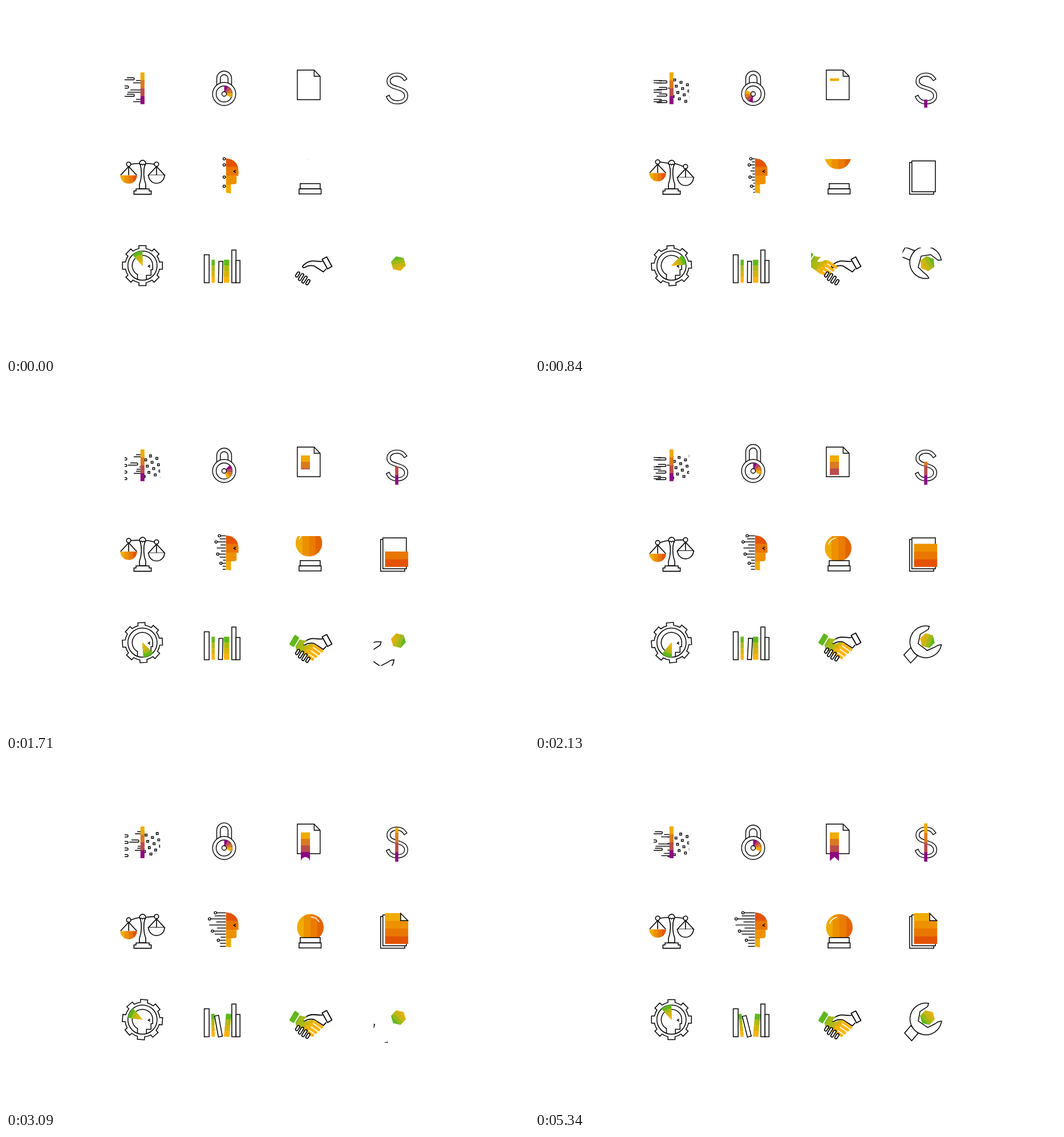
These frames come from a looping animation (917x611 px, 5.4 s). An HTML page with a canvas:

```html
<!DOCTYPE html>
<html lang="en">
<head>
<meta charset="utf-8">
<title>Icons</title>
<style>
html, body { margin: 0; width: 100%; height: 100%; overflow: hidden; background: #fff; }
canvas { display: block; }
</style>
</head>
<body>
<canvas id="stage" width="917" height="611"></canvas>
<script>
const ctx = document.getElementById('stage').getContext('2d');
const LOOP = 5400;
const PURPLE = ['#f0ab00', '#da7a22', '#bd4b4b', '#8d0a82'];
const ORANGE = ['#f0ab00', '#ee9100', '#e97600', '#e45304'];
const GREEN = ['#5fb91c', '#b3b814', '#d6b40f', '#ffb30b'];

const rad = d => d * Math.PI / 180;
const frac = v => v - Math.floor(v);
const clamp = v => Math.max(0, Math.min(1, v));
const smooth = v => { v = clamp(v); return v * v * (3 - 2 * v); };
const hump = v => v > 0 && v < 1 ? Math.sin(Math.PI * v) : 0;

// Eased value between [time, value] pairs
function key(t, ...pairs) {
  let value = pairs[0][1];
  for (let i = 1; i < pairs.length; i++) {
    const [t0, v0] = pairs[i - 1], [t1, v1] = pairs[i];
    value += (v1 - v0) * smooth((t - t0) / (t1 - t0));
  }
  return value;
}

function group(draw) {
  ctx.save();
  draw();
  ctx.restore();
}

function clipRect(x0, y0, x1, y1) {
  ctx.beginPath();
  ctx.rect(x0, y0, x1 - x0, y1 - y0);
  ctx.clip();
}

function turn(x, y, deg) {
  ctx.translate(x, y);
  ctx.rotate(rad(deg));
  ctx.translate(-x, -y);
}

function paint(fill, stroke = true) {
  if (fill) { ctx.fillStyle = fill; ctx.fill(); }
  if (stroke) ctx.stroke();
}

function poly(points, fill, closed = true, stroke = true) {
  ctx.beginPath();
  points.forEach(([x, y]) => ctx.lineTo(x, y));
  if (closed) ctx.closePath();
  paint(fill, stroke);
}

const line = (x0, y0, x1, y1) => poly([[x0, y0], [x1, y1]], null, false);

function box(x0, y0, x1, y1, fill = '#fff') {
  ctx.beginPath();
  ctx.rect(x0, y0, x1 - x0, y1 - y0);
  paint(fill);
}

function disc(x, y, r, fill = '#fff') {
  ctx.beginPath();
  ctx.arc(x, y, r, 0, 7);
  paint(fill);
}

function sector(x, y, r, a0, a1, fill) {
  ctx.beginPath();
  ctx.moveTo(x, y);
  ctx.arc(x, y, r, rad(a0), rad(a1));
  paint(fill, false);
}

function bands(x, y, w, h, colors, across = false) {
  const n = colors.length;
  colors.forEach((c, i) => {
    const overlap = i < n - 1 ? 0.4 : 0;
    ctx.fillStyle = c;
    if (across) ctx.fillRect(x + w * i / n, y, w / n + overlap, h);
    else ctx.fillRect(x, y + h * i / n, w, h / n + overlap);
  });
}

function hook(x, y, len) {
  ctx.beginPath();
  ctx.moveTo(x + 2, y);
  ctx.arc(x + len - 2, y + 1.9, 1.9, -Math.PI / 2, Math.PI / 2);
  ctx.lineTo(x - 2, y + 3.8);
  ctx.stroke();
}

// One repeat of the stream: three rows of a hook and two dashes, then trailing hooks
function stream(off) {
  for (let row = 0; row < 3; row++) {
    const x = off - 10 * (row % 2), y = 125.5 + 14.5 * row;
    hook(x + 210, y, 15);
    for (let k = 0; k < 2; k++) line(x + 228 - 5 * k, y + 5 + 2 * row + 4 * k, off + 243, y + 5 + 2 * row + 4 * k);
  }
  for (let k = 0; k < 4; k++) hook(off + 180, 131 + 11.5 * k, 16);
}

function dataBar(t) {
  ctx.lineWidth = 1.4;
  group(() => {
    clipRect(208, 112, 243, 174);
    const off = Math.min(t, 3950) / 1330 % 1 * 56;
    stream(off);
    stream(off - 56);
  });
  group(() => {
    clipRect(240, 112, 270.3, 174);
    for (let i = 0; i < 63; i++) {
      const x = 240 + (Math.min(t, 3990) - 50 - 62 * i) * 0.045;
      const y = 127 + 40 * frac(i * 0.7236 + 0.1);
      if (x > 240 && x < 274) box(x - 1.7, y - 1.7, x + 1.7, y + 1.7);
    }
  });
  bands(235.8, 116.3, 7, 55.6, PURPLE);
}

function lock(t) {
  const x = 382.5, y = 154;
  const top = 127 - 10 * hump((t - 1800) / 1480);
  ctx.lineWidth = 1.4;
  for (const r of [13, 6.8]) {
    ctx.beginPath();
    ctx.moveTo(x - r, 140);
    ctx.arc(x, top, r, Math.PI, 0);
    ctx.lineTo(x + r, 140);
    ctx.stroke();
  }
  disc(x, y, 20.3);
  disc(x, y, 14);
  const a = 185 * hump(t / 1850) - 90;
  for (let i = 0; i < 4; i++) sector(x, y, 14.4, a + i * 29, a + i * 29 + 29.5, PURPLE[3 - i]);
  disc(x, y, 4);
}

function certificate(t) {
  ctx.lineWidth = 1.4;
  poly([[510.7, 112.3], [540.3, 112.3], [550.8, 123], [550.8, 164], [510.7, 164]], '#fff');
  poly([[540.3, 112.3], [540.3, 123], [550.8, 123]], null, false);
  const bottom = 126.5 + 50.2 * clamp((t - 630) / 2180);
  const notch = 7 * clamp((t - 2800) / 250);
  const bend = notch * 0.36 * (1 - clamp((t - 3090) / 400));
  group(() => {
    const y = bottom - notch / 2 - bend;
    ctx.beginPath();
    ctx.moveTo(517, 126.5);
    ctx.lineTo(533, 126.5);
    ctx.lineTo(533, bottom);
    ctx.quadraticCurveTo(529 + bend, y, 525, bottom - notch);
    ctx.quadraticCurveTo(521 - bend, y, 517, bottom);
    ctx.clip();
    bands(517, 126.5, 16, 34.5, PURPLE.slice(0, 3));
    ctx.fillStyle = PURPLE[3];
    ctx.fillRect(517, 161, 16, 16);
  });
}

const LETTER = new Path2D('M699 127C696 122.5 691.5 120.2 685.5 120.2C676.5 120.2 670.8 125 670.8 131.5' +
  'C670.8 138.5 677 141 685.5 143.5C695 146.3 701.6 149.5 701.6 157C701.6 164.5 695 168.6 686 168.6' +
  'C678.5 168.6 673 165.5 670.5 160');

function dollar(t) {
  group(() => {
    ctx.lineCap = 'square';
    ctx.lineWidth = 7;
    ctx.stroke(LETTER);
    ctx.strokeStyle = '#fff';
    ctx.lineWidth = 4.3;
    ctx.stroke(LETTER);
  });
  group(() => {
    clipRect(682, 178 - 67 * clamp((t - 130) / 3320), 688.5, 178);
    bands(682.3, 111, 5.7, 67, PURPLE);
  });
}

function scales(t) {
  const tilt = key(t, [0, 0], [600, -4], [1260, -4], [2300, 2.9], [3300, 2.9], [3990, 0]);
  const x = 239.5;
  ctx.lineWidth = 1.6;
  ctx.beginPath();
  ctx.moveTo(235.5, 278);
  ctx.bezierCurveTo(238.5, 288, 238, 302, 234, 312);
  ctx.lineTo(234, 320);
  ctx.lineTo(245, 320);
  ctx.lineTo(245, 312);
  ctx.bezierCurveTo(241, 302, 240.5, 288, 243.5, 278);
  ctx.stroke();
  poly([[228, 320.3], [251, 320.3], [251, 323.8], [254.6, 323.8], [254.6, 329.6],
    [224.4, 329.6], [224.4, 323.8], [228, 323.8]], '#fff');
  ctx.beginPath();
  ctx.arc(x, 275.5, 5.4, rad(150), rad(390));
  ctx.quadraticCurveTo(x + 2, 275.6, x, 278.3);
  ctx.quadraticCurveTo(x - 2, 275.6, x - 4.7, 278.2);
  paint('#fff');
  for (const side of [-1, 1]) {
    const px = x + side * 24.4, py = 277 - side * tilt, pan = py + 19.3;
    ctx.beginPath();
    ctx.moveTo(px - side * 4, py);
    ctx.quadraticCurveTo(x + side * 12, 275.7 - side * tilt * 0.4, x + side * 5, 275.5);
    ctx.stroke();
    poly([[px - 14.2, pan], [px, py + 4], [px + 14.2, pan]], '#fff', side > 0);
    line(px, py + 4, px, pan);
    ctx.beginPath();
    ctx.arc(px, pan, side < 0 ? 14.7 : 14, 0, Math.PI);
    if (side > 0) paint('#fff');
    else group(() => { ctx.clip(); bands(px - 15, pan, 30, 15, ORANGE, true); });
    disc(px, py, 3.8);
  }
}

function eye(x, y, s) {
  poly([[x + s * 1.6, y - s], [x, y], [x + s * 1.6, y + s]], null, false);
}

const WIRES = [21, 23, 33, 20, 34, 18, 27, 23, 11, 15, 12, 12];
const RINGS = [0, 2, 6, 9];

function circuitHead(t) {
  const p = clamp(t / 3600), x = 385.6;
  ctx.lineWidth = 1.4;
  WIRES.forEach((len, i) => {
    const y = 267.5 + 5.34 * i, ring = RINGS.includes(i);
    const end = ring ? x - 3 - (len - 3) * p : x - len * p;
    line(end, y, x, y);
    if (ring) disc(end, y, 2.1);
  });
  group(() => {
    ctx.beginPath();
    ctx.moveTo(x, 267);
    ctx.bezierCurveTo(399, 267, 407.6, 276, 407.6, 288);
    ctx.lineTo(407.6, 297.3);
    ctx.lineTo(404.3, 297.3);
    ctx.lineTo(404.3, 308);
    ctx.quadraticCurveTo(404.3, 312, 400.3, 312);
    ctx.lineTo(394.5, 312);
    ctx.lineTo(394.5, 328.3);
    ctx.lineTo(x, 326.8);
    ctx.clip();
    bands(x, 266, 23, 62.5, [...ORANGE].reverse());
  });
  eye(399.3, 289.4, 2.3);
}

function crystalBall(t) {
  const y = Math.min(293, 254.3 + (t - 450) * 0.0207);
  const x = key(t, [2000, 531.1], [2500, 533.6]), r = 23.4;
  group(() => {
    clipRect(500, 268, 566, 320);
    ctx.beginPath();
    ctx.arc(x, y, r, 0, 7);
    ctx.clip();
    bands(x - r, y - r, 2 * r, 2 * r, ['#f0ab00', '#ed9000', '#ea7c00', '#e56402'], true);
    ctx.strokeStyle = '#fff';
    ctx.lineWidth = 1.5;
    const a = key(t, [2200, 0], [3090, 72], [3900, 0]);
    ctx.beginPath();
    ctx.arc(x, y, 18.3, rad(200 + a), rad(257 + a));
    ctx.stroke();
  });
  ctx.lineWidth = 1.5;
  box(515.8, 311, 550.8, 320.3);
  box(513.8, 320.3, 552.5, 329);
}

// The parts pop in one after another, 450 ms apart
function pages(t) {
  const shown = Math.floor((t - 330) / 450) + 1;
  ctx.lineWidth = 1.5;
  if (shown > 0) box(656.8, 274, 699.2, 329.4);
  if (shown > 1) box(660.8, 271.2, 702, 325.2);
  const n = Math.max(0, Math.min(4, shown - 2));
  if (n) bands(664.6, 322 - 13.5 * n, 40.6, 13.5 * n, ORANGE.slice(4 - n));
  if (shown > 6) {
    ctx.fillStyle = '#fff';
    ctx.fillRect(692, 267, 14, 14);
    poly([[692, 268.5], [704.6, 281.2], [692, 281.2]], '#fff');
  }
}

function gear(t) {
  const x = 239.3, y = 454.5, a = Math.min(360, t * 0.1035);
  ctx.lineWidth = 1.5;
  group(() => {
    ctx.translate(x, y);
    ctx.rotate(rad(a));
    ctx.beginPath();
    for (let i = 0; i < 8; i++) {
      ctx.lineTo(29.9, -6.2);
      ctx.lineTo(35, -6.2);
      ctx.lineTo(35, 6.2);
      ctx.arc(0, 0, 30.5, rad(11.7), rad(33.3));
      ctx.rotate(rad(45));
    }
    ctx.closePath();
    ctx.stroke();
  });
  disc(x, y, 25.6);
  ctx.beginPath();
  ctx.moveTo(230.5, 478.6);
  ctx.lineTo(230.5, 470);
  ctx.arc(x, y, 18, rad(120), rad(352));
  ctx.lineTo(257.3, 461.5);
  ctx.lineTo(254.3, 461.5);
  ctx.lineTo(254.3, 471.5);
  ctx.lineTo(246.2, 471.5);
  ctx.lineTo(246.2, 478.6);
  ctx.stroke();
  eye(249.5, 455.5, 2);
  GREEN.forEach((c, i) => sector(x, y, 25.8 - i * 6.3, a - 133, a - 90, c));
}

function lean(x, deg, draw) {
  group(() => {
    turn(x, 484.4, deg);
    draw();
  });
}

function books(t) {
  ctx.lineWidth = 1.5;
  box(347.6, 435.5, 356.2, 484.4);
  lean(363.3, key(t, [2950, 0], [3500, -5.5]), () => bands(360.5, 444.2, 5.5, 40.3, GREEN));
  lean(376, key(t, [0, 1.4], [1260, 0], [2130, 3], [3500, -14]), () => box(372.4, 447, 379.4, 484.2));
  lean(386.6, key(t, [2150, 0], [2900, 5.5]), () => bands(382, 444.2, 9.5, 40.3, GREEN));
  box(395.9, 427.2, 403.3, 484.4);
  box(403.3, 445.6, 410.3, 484.4);
}

// Round-ended bar around a centre, pointing along an angle
function capsule(x, y, half, deg, width, color) {
  const dx = half * Math.cos(rad(deg)), dy = half * Math.sin(rad(deg));
  ctx.lineWidth = width;
  ctx.strokeStyle = color;
  line(x - dx, y - dy, x + dx, y + dy);
}

function colorHand() {
  ctx.lineJoin = ctx.lineCap = 'round';
  ctx.strokeStyle = GREEN[0];
  ctx.lineWidth = 3;
  poly([[507, 441.5], [512.5, 445.5], [504, 459.5], [498.3, 456]], GREEN[0]);
  group(() => {
    ctx.beginPath();
    ctx.moveTo(515, 448);
    ctx.quadraticCurveTo(521, 450, 527.5, 449.5);
    ctx.quadraticCurveTo(523, 453.5, 520.5, 458);
    ctx.quadraticCurveTo(528, 459.5, 535, 455);
    ctx.lineTo(541, 456.5);
    ctx.lineTo(527, 480);
    ctx.lineTo(509, 467);
    ctx.lineTo(507.5, 460);
    ctx.clip();
    turn(522, 465, 30);
    bands(500, 435, 44, 60, ['#86ba18', '#a9b914', '#c9b60f', '#e0b40d'], true);
  });
  for (let i = 0; i < 4; i++) capsule(546.7 - 5.4 * i, 463.2 + 4.8 * i, 8.5, 35, 5.2, GREEN[3]);
}

function handshake(t) {
  group(() => {
    clipRect(484, 425, 582, 496);
    const shake = clamp((t - 1260) / 2320);
    ctx.translate(0, 1.5 * Math.sin(4 * Math.PI * shake));
    ctx.lineWidth = 1.8;
    ctx.lineJoin = 'round';
    ctx.beginPath();
    ctx.moveTo(555, 447);
    ctx.bezierCurveTo(549, 448.5, 543, 445.5, 535, 446.7);
    ctx.bezierCurveTo(528, 448, 523, 452, 519.7, 456);
    ctx.quadraticCurveTo(520.5, 459, 524, 457.5);
    ctx.bezierCurveTo(530, 454, 534, 453.5, 540, 455);
    ctx.lineTo(556.5, 465.5);
    ctx.lineTo(561.5, 460);
    paint('#fff');
    poly([[554.3, 443.5], [562.3, 439.3], [571.4, 456], [563.8, 460.3]], '#fff');
    const away = 1 - clamp((t - 50) / 1210);
    group(() => {
      ctx.translate(-75 * away, -30 * away);
      colorHand();
    });
    ctx.lineCap = 'round';
    for (let i = 0; i < 4; i++) {
      const place = [511.3 + 6 * i, 470 + 4.5 * i, 2.8 + 2.1 * Math.sin(Math.PI * i / 3), 122];
      capsule(...place, 6, '#000');
      capsule(...place, 2.7, '#fff');
    }
  });
}

// Slides in, turns the nut, leaves upwards; the last visit stays
function wrench(t) {
  const x = 688, y = 451, cycle = 1525;
  const n = Math.min(2, Math.floor(t / cycle)), phase = t - n * cycle;
  const spin = n < 2 ? 120 * smooth((phase - 560) / 500) : 0;
  const away = 61 * (1 - clamp(phase / 600));
  const leave = n < 2 ? Math.max(0, phase - 1100) * 0.145 : 0;
  ctx.lineWidth = 1.5;
  if (phase > 30 && leave < 48) group(() => {
    clipRect(644.5, 423, 718, 495);
    ctx.translate(-away * 0.77 - leave * 0.25, away * 0.65 - leave);
    turn(x, y, spin);
    poly([[659, 465], [672, 478], [660.5, 491.5], [648, 478]], '#fff');
    ctx.beginPath();
    ctx.arc(685.3, 453.3, 27.8, rad(-80), rad(8), true);
    ctx.quadraticCurveTo(708, 457, 702, 461.5);
    ctx.lineTo(688.5, 468.3);
    ctx.lineTo(672, 457);
    ctx.lineTo(675, 440.5);
    ctx.lineTo(688.5, 431.5);
    ctx.closePath();
    paint('#fff');
  });
  group(() => {
    ctx.translate(x, y);
    ctx.rotate(rad(120 * n + spin));
    ctx.beginPath();
    for (let i = 0; i < 6; i++) {
      const a = rad(13 + 60 * i);
      ctx.lineTo(13.4 * Math.cos(a), 13.4 * Math.sin(a));
    }
    ctx.clip();
    ctx.rotate(rad(-12));
    bands(-15, -13.4, 30, 26.8, ['#5fb91c', '#9db918', '#c8b612', '#e6b00d']);
  });
}

const ICONS = [dataBar, lock, certificate, dollar, scales, circuitHead,
  crystalBall, pages, gear, books, handshake, wrench];

let begin;
function frame(now) {
  begin ??= now;
  const t = (now - begin) % LOOP;
  ctx.fillStyle = '#fff';
  ctx.fillRect(0, 0, 917, 611);
  ctx.strokeStyle = '#000';
  for (const icon of ICONS) group(() => icon(t));
  requestAnimationFrame(frame);
}
requestAnimationFrame(frame);
</script>
</body>
</html>
```
